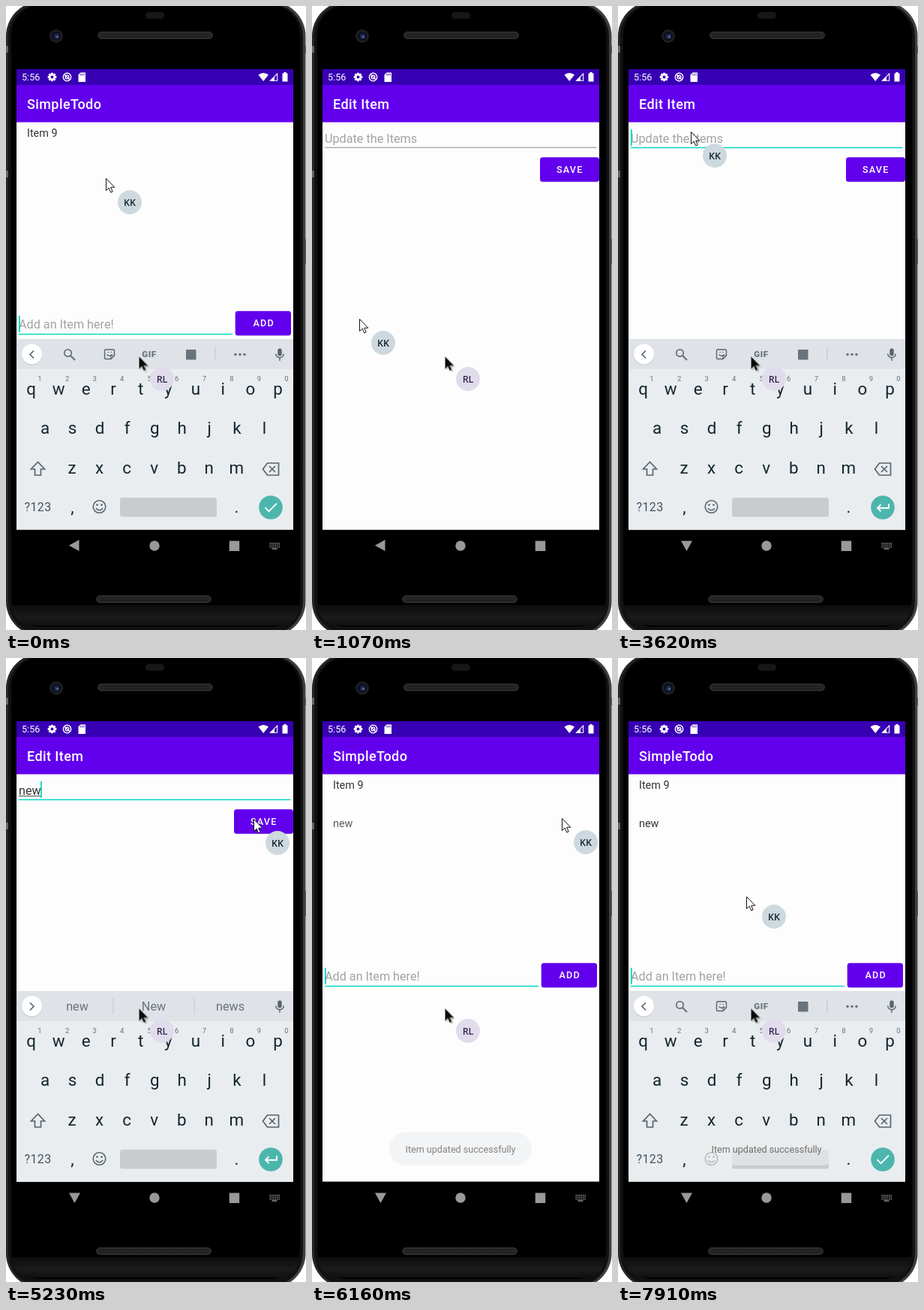
An HTML page that plays this animation: 400x830 px, repeating every 8 s.

```html
<!DOCTYPE html>
<html lang="en">
<head>
<meta charset="utf-8">
<title>SimpleTodo</title>
<style>
html, body { margin: 0; width: 100%; height: 100%; overflow: hidden; background: #fff; }
svg { display: block; width: 100vw; height: 100vh; }
text { font-family: Roboto, sans-serif; }
.mid { text-anchor: middle; }
.title { font-size: 18px; font-weight: 500; letter-spacing: .4px; fill: #fff; }
.item { font-size: 14.4px; fill: #333; }
.field { font-size: 16.2px; fill: #333; }
.hint { fill: #a2a2a2; }
.btn { font-size: 12.6px; font-weight: 500; letter-spacing: 1.2px; fill: #fff; }
.key { font-size: 22.4px; fill: #14252d; }
.num { font-size: 9.5px; fill: #66717a; }
.sugg { font-size: 16.2px; fill: #69737b; }
.badge { font: 600 12.5px "Open Sans", sans-serif; }
.line { fill: none; stroke: #59646c; stroke-width: 1.7; }
.white { fill: none; stroke: #fff; stroke-width: 1.9; }
</style>
</head>
<body>
<svg id="stage" viewBox="0 0 400 830" preserveAspectRatio="none"></svg>
<script>
const LOOP = 8000;

const TICKS = [0, 120, 250, 380, 530, 650, 800, 1070, 1920, 2070, 2210, 2350, 2470, 2610, 2760, 2880,
  3030, 3180, 3620, 3930, 4050, 4200, 4520, 4830, 4970, 5100, 5230, 5380, 5500, 5620, 5770, 5890,
  6040, 6160, 6280, 6430, 6980, 7410, 7540, 7660, 7780, 7910];
const BLINKS = [0, 3180, 3620, 4520, 4970, 5500, 6040, 6430, 6980, 7540, 7910];

// Pointer path: time, x, y, badge lag x, badge lag y
const PATH = [
  [0, 133, 229], [380, 133, 229], [530, 84, 360], [650, 63, 411], [800, 63, 415], [1070, 63, 416],
  [1919, 63, 416], [1920, 93, 222], [2070, 97, 182, 0, 14], [2210, 98, 172, 0, 3], [2350, 97, 167],
  [4829, 97, 167], [4830, 248, 198], [4970, 300, 210], [5100, 324, 214], [5230, 330, 214],
  [5380, 333, 213], [7340, 333, 213], [7410, 312, 224, 5, -5], [7910, 171, 317, 5, -5]
];

const rect = (x, y, w, h, fill, r = 0, more = '') =>
  `<rect x="${x}" y="${y}" width="${w}" height="${h}" rx="${r}" fill="${fill}" ${more}/>`;
const circle = (x, y, r, fill, more = '') => `<circle cx="${x}" cy="${y}" r="${r}" fill="${fill}" ${more}/>`;
const text = (x, y, cls, str, more = '') => `<text x="${x}" y="${y}" class="${cls}" ${more}>${str}</text>`;
const path = (d, more = '') => `<path d="${d}" ${more}/>`;
const group = (id, body, more = '') => `<g id="${id}" ${more}>${body}</g>`;

function grille(x, y) {
  return rect(x, y, 153, 9, '#262626', 4.5, 'stroke="#3c3c3c" stroke-width=".8"') +
    `<path d="M${x + 5} ${y + 3}h143M${x + 5} ${y + 6}h143" stroke="#161616" stroke-width="1.2" stroke-dasharray="1.5 1"/>`;
}

function phone() {
  return rect(0, 0, 400, 830, '#fff') +
    rect(397, 53, 3, 10, '#777') + rect(397, 310, 3, 33, '#777') +
    rect(0, -6, 399.5, 844, 'url(#rim)', 46) +
    rect(3, -3, 393, 838, '#111', 43) +
    rect(7, -1, 385, 827, '#000', 39) +
    path('M8 797H391Q390 824 360 824H40Q10 824 8 797Z', 'fill="url(#chin)"') +
    rect(0, 53, 3, 9, '#666') + rect(0, 219, 3, 9, '#666') +
    rect(186, 8, 25, 9, '#171717', 4.5) +
    circle(67, 40, 9, '#1d1e22') + circle(67, 40, 6, '#0c0f1c') + circle(67.5, 40.5, 3.4, '#1f2c55') +
    circle(68.5, 41, 1.2, '#6f80b0') +
    grille(122.5, 34.5) + grille(120.5, 784.5);
}

function statusBar() {
  const teeth = [0, 45, 90, 135].map(a =>
    rect(-1.4, -5.8, 2.8, 11.6, '#fff', .5, `transform="rotate(${a})"`)).join('');
  return rect(14, 84, 369, 21, '#3700b3') +
    text(21, 99.3, 'field', '5:56', 'style="font-size:12.6px;fill:#fff"') +
    `<g transform="translate(61.5 94.5)">${teeth}${circle(0, 0, 4.2, '#fff')}${circle(0, 0, 1.9, '#3700b3')}</g>` +
    circle(81.5, 94.5, 5.2, 'none', 'stroke="#fff" stroke-width="1.4"') +
    circle(81.5, 94.5, 2.4, 'none', 'stroke="#fff" stroke-width="1.3"') +
    path('M78 91l7 7', 'stroke="#fff" stroke-width="1.2"') +
    path('M99.5 88.5H106V101H96.5V91.5Z', 'fill="#fff"') +
    path('M99.8 90v2.5M102 90v2.5M104.2 90v2.5', 'stroke="#3700b3" stroke-width=".9"') +
    path('M336.5 91.5Q343 86.5 350 91.5L343.2 100Z', 'fill="#fff"') +
    path('M352.5 99.3H361.7V90Z', 'fill="none" stroke="#fff" stroke-width="1.1"') +
    path('M352 99.8L358 94V99.8Z', 'fill="#fff"') +
    path('M368.5 89.5h2v-1.5h3v1.5h2V100.5h-7Z', 'fill="#fff"');
}

const page = title => rect(14, 84, 369, 613, '#fdfdfd') + statusBar() +
  rect(14, 105, 369, 49.6, '#6200ee') + text(28, 137, 'title', title);

const button = (x, y, w, label) =>
  rect(x, y + .7, w, 32.5, '#000', 3.5, 'opacity=".1"') + rect(x, y, w, 32.5, '#6200ee', 3.5) +
  text(343.7, y + 20.7, 'btn mid', label);

function listPage() {
  return page('SimpleTodo') + text(28, 174.3, 'item', 'Item 9') +
    text(28, 225.3, 'item', 'new', 'id="added"') +
    text(17, 429.3, 'field hint', 'Add an Item here!') +
    rect(17, 435.8, 285, 1.5, '#03dac5') +
    rect(17, 412, 1.8, 22, '#03dac5', 0, 'id="listCaret"') +
    button(305.7, 405.7, 74.3, 'ADD');
}

function editPage() {
  return page('Edit Item') + text(17, 181.5, 'field hint', 'Update the Items', 'id="editHint"') +
    text(17, 181.5, 'field', '', 'id="typed"') +
    rect(17, 183.2, 29, 1, '#444', 0, 'id="underline"') +
    rect(17, 187.7, 362.5, 1, '#8a8a8a', 0, 'id="editLine"') +
    rect(17, 164, 1.8, 22, '#03dac5', 0, 'id="editCaret"') +
    button(304, 201.2, 79, 'SAVE');
}

function toolbar() {
  const dots = [306, 312, 318].map(x => circle(x, 463.5, 1.8, '#69737b')).join('');
  return group('tools',
    path('M37 458.5l-5 5 5 5', 'class="line"') +
    circle(82.5, 461.5, 4.7, 'none', 'stroke="#69737b" stroke-width="1.8"') +
    path('M86 465l6 6', 'stroke="#69737b" stroke-width="2.2"') +
    path('M133 457H143Q144.500 457 144.500 458.500V465L140 469.500H133Q131.500 469.500 131.500 468V458.500Q131.500 457 133 457Z', 'class="line" style="stroke-width:1.4"') +
    path('M134.5 463.5q3.5 3.5 7 0M135.5 460.5h1.500M139.5 460.5h1.500M140 469v-4h4', 'class="line" style="stroke-width:1.2"') +
    text(191, 467, 'mid', 'GIF', 'font-size="11.5" font-weight="900" letter-spacing=".7" fill="#69737b"') +
    rect(240, 457, 13.5, 13.5, '#69737b', 1) +
    rect(278.5, 454, 1, 18, '#c3c8cc') + dots) +
  group('words',
    path('M32 458.5l5 5-5 5', 'class="line"') +
    text(95, 469, 'sugg mid', 'new') + text(197, 469, 'sugg mid', 'New') + text(299, 469, 'sugg mid', 'news') +
    rect(142.5, 452, 1, 22, '#c3c8cc') + rect(250.5, 452, 1, 22, '#c3c8cc')) +
  rect(362.3, 455.5, 5.4, 10, '#59646c', 2.7) +
  path('M359.7 462.5a5.3 5.3 0 0 0 10.6 0M365 468v4', 'class="line" style="stroke-width:1.4"');
}

function keyboard() {
  const row = (str, x, y) => [...str].map((c, i) => text(x + i * 36.55, y, 'key mid', c)).join('');
  const nums = [...'1234567890'].map((c, i) => text(45 + i * 36.55, 499, 'num mid', c)).join('');
  return rect(14, 443, 369, 254, '#e9edf0') + rect(14, 443, 369, 40, '#dfe3e7') +
    circle(34.5, 464, 14, '#000', 'opacity=".08"') + circle(34.5, 463, 13.5, '#fff') +
    toolbar() + nums +
    row('qwertyuiop', 33.5, 516.5) + row('asdfghjkl', 52, 569.2) + row('zxcvbnm', 88, 622) +
    path('M42.5 606.5L33.5 616H38.5V624H46.5V616H51.5Z', 'class="line"') +
    path('M348.5 608H363.5V624H348.5L342.5 616ZM351 612l8 8M359 612l-8 8', 'class="line"') +
    text(42.5, 672, 'mid', '?123', 'font-size="16" fill="#46535b" letter-spacing=".4"') +
    text(88.5, 674, 'key mid', ',') + text(307.5, 674, 'key mid', '.') +
    circle(124.5, 666, 8.3, 'none', 'stroke="#59646c" stroke-width="1.6"') +
    circle(121.5, 663.6, 1.3, '#59646c') + circle(127.5, 663.6, 1.3, '#59646c') +
    path('M119.8 668q4.7 5.5 9.4 0', 'class="line" style="stroke-width:1.5"') +
    rect(152, 654, 129, 25.5, '#c8ccce', 3) +
    circle(353, 667, 15.8, '#4db6ac') +
    path('M345.5 667.2l5 5L361 661.7', 'class="white" id="check"') +
    path('M361 662.2V667.7H346.5M350.5 663.2L346 667.7l4.5 4.5', 'class="white" id="enter"');
}

function navBar() {
  let dots = '';
  for (let r = 0; r < 3; r++)
    for (let c = 0; c < 6; c++) dots += rect(351.5 + c * 2.4, 714 + r * 2.5, 1.4, 1.4, '#999');
  return rect(14, 696, 369, 43, '#000') +
    path('M-7.5 0L6 -7.5V7.5Z', 'id="back" fill="#999"') +
    circle(198, 718, 6.7, '#999') + rect(297.7, 711.5, 13.5, 13.5, '#999') +
    group('imeIcon', dots + rect(354.5, 721.3, 7, 1.4, '#999'));
}

const ARROW = 'M0 0V16L3.7 12.6 6.2 18.4 8.7 17.3 6.2 11.7H11.3Z';
const badge = (id, x, y, fill, ink, str) =>
  group(id, circle(0, 0, 16, fill) + text(0, 4.5, 'badge mid', str, `fill="${ink}"`), `transform="translate(${x} ${y})"`);

document.getElementById('stage').innerHTML =
  `<defs><clipPath id="screen">${rect(14, 84, 369, 612.5, '#000')}</clipPath>
  <linearGradient id="rim"><stop stop-color="#262626"/><stop offset="1" stop-color="#404040"/></linearGradient>
  <linearGradient id="chin" x2="0" y2="1"><stop stop-color="#0c0c0c"/><stop offset=".6" stop-color="#1b1b1b"/><stop offset="1" stop-color="#101010"/></linearGradient>
  <filter id="soft" x="-50%" y="-50%" width="200%" height="200%"><feGaussianBlur stdDeviation="1.2"/></filter></defs>` +
  phone() + navBar() +
  `<g clip-path="url(#screen)">` + listPage() + group('edit', editPage()) + group('ime', keyboard()) +
  group('toast', rect(103, 631, 190, 44, '#ebedee', 22, 'opacity=".65"') +
    text(198, 657.8, 'mid', 'Item updated successfully', 'font-size="12.6" fill="#707070"')) + '</g>' +
  path(ARROW, 'transform="translate(179 468)" fill="#555" opacity=".6" filter="url(#soft)"') +
  path(ARROW, 'transform="translate(177.5 466.5)" fill="#0a0a0a" stroke="#8a8a8a" stroke-width=".8"') +
  badge('guest', 208, 496, '#e1dcec', '#30264f', 'RL') +
  path(ARROW, 'id="arrow" fill="#fff" stroke="#111" stroke-width="1"') +
  badge('host', 0, 0, '#cdd9df', '#10242c', 'KK');

const el = {};
document.querySelectorAll('[id]').forEach(e => el[e.id] = e);

const set = (id, attr, v) => el[id].setAttribute(attr, v);
const fade = (id, v) => set(id, 'opacity', +v);
const ramp = (t, a, b) => Math.min(1, Math.max(0, (t - a) / (b - a)));
const easeOut = p => 1 - (1 - p) ** 3;
const within = (t, a, b) => t >= a && t < b;

function pointer(t) {
  let i = 0;
  while (i < PATH.length - 2 && PATH[i + 1][0] <= t) i++;
  const [a, b] = [PATH[i], PATH[i + 1]];
  const p = ramp(t, a[0], b[0]);
  return [1, 2, 3, 4].map(k => (a[k] || 0) + ((b[k] || 0) - (a[k] || 0)) * p);
}

function imeShown(t) {
  if (t < 1000) return 1 - ramp(t, 0, 250);
  if (t < 5700) return easeOut(ramp(t, 2880, 3180));
  return t < 6280 ? 1 - ramp(t, 5640, 5890) : 1;
}

function backAngle(t) {
  if (t < 2700) return 0;
  return t < 3000 ? 62 + 110 * ramp(t, 2760, 2880) : 270;
}

function draw(time) {
  const t = TICKS.filter(k => k <= time).pop();
  const caret = BLINKS.filter(k => k <= t).length % 2;
  const focused = t >= 2610;
  const word = t < 3930 ? '' : t < 4050 ? 'ne' : 'new';
  const editing = within(t, 380, 5890);

  const open = t < 3000 ? easeOut(ramp(t, 120, 650)) : 1 - ramp(t, 5640, 6040);
  fade('edit', open);
  set('edit', 'transform', `translate(0 ${25 * (1 - open)})`);
  fade('editHint', !word);
  el.typed.textContent = word;
  const wordWidth = word.length * 9.8;
  set('underline', 'width', wordWidth);
  set('editLine', 'fill', focused ? '#03dac5' : '#8a8a8a');
  set('editLine', 'height', focused ? 1.5 : 1);
  fade('editCaret', focused && caret);
  set('editCaret', 'x', 17 + wordWidth - (word ? .4 : 0));

  fade('listCaret', caret);
  fade('added', t < 3000 ? 0 : ramp(t, 5890, 6230));

  const shown = imeShown(t);
  fade('ime', shown);
  set('ime', 'transform', `translate(0 ${24 * (1 - shown)})`);
  const words = within(t, 4200, 6000);
  fade('tools', !words);
  fade('words', words);
  fade('check', !editing);
  fade('enter', editing);
  fade('imeIcon', t < 250 || t >= 2760);
  set('back', 'transform', `translate(91.5 717.5) rotate(${backAngle(t)})`);

  fade('toast', t < 6000 ? 0 : ramp(t, 5900, 6200));

  const [x, y, lagX, lagY] = pointer(t);
  set('arrow', 'transform', `translate(${x + .5} ${y + .5})`);
  set('host', 'transform', `translate(${x + 32 + lagX} ${y + 32 + lagY})`);
}

const start = performance.now();
function tick() {
  draw((performance.now() - start) % LOOP);
  requestAnimationFrame(tick);
}
tick();
</script>
</body>
</html>
```
